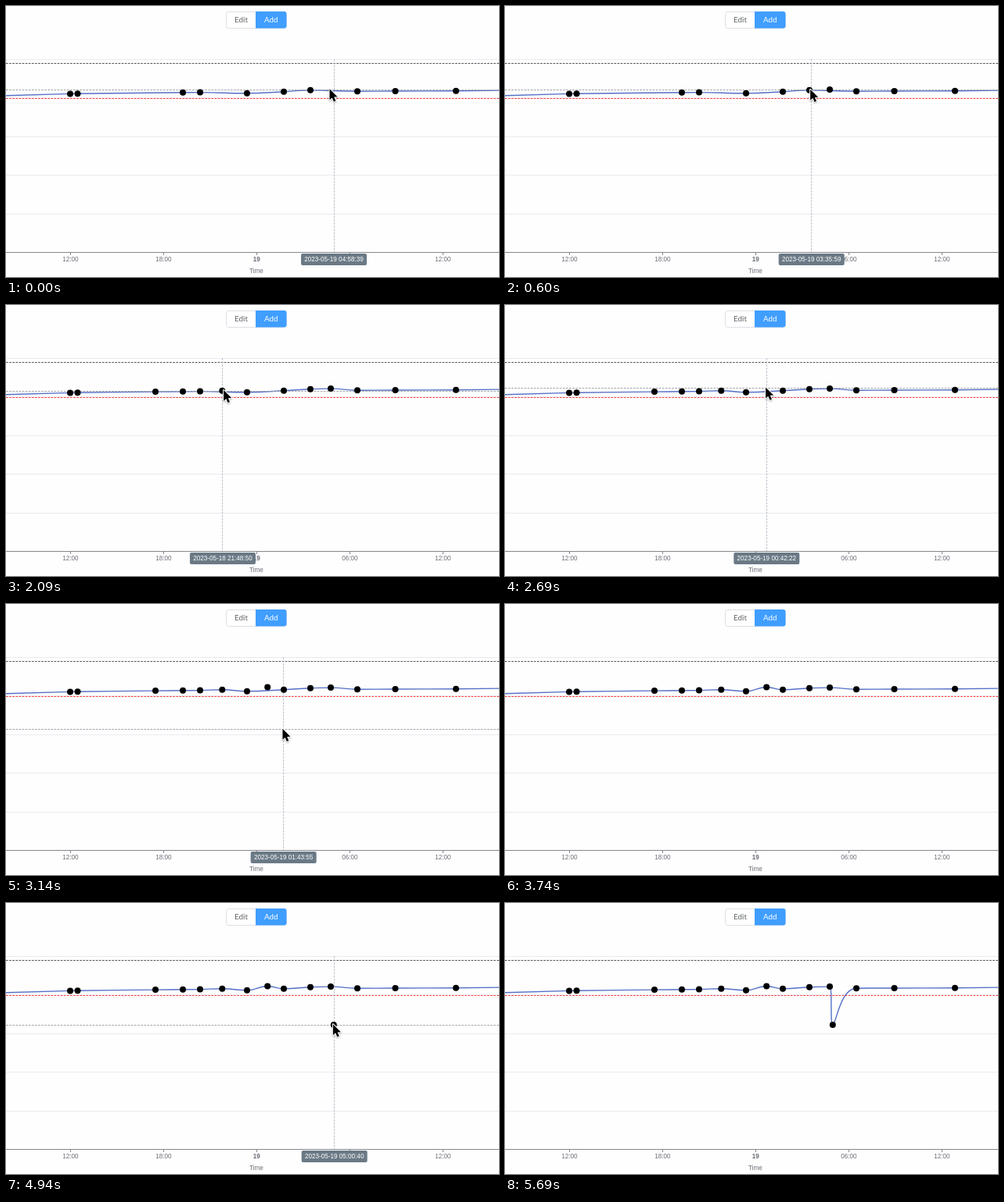
Recreate the animation shown at these times as an HTML page with a canvas. Size 630 by 347 pixels, loop 6.3 s.

```html
<!DOCTYPE html>
<html lang="en">
<head>
<meta charset="utf-8">
<title>Time chart</title>
<style>
  html, body { margin: 0; width: 100%; height: 100%; overflow: hidden; background: #fefefe; }
  canvas { display: block; width: 630px; height: 347px; }
</style>
</head>
<body>
<canvas id="stage"></canvas>
<script>
const W = 630, H = 347, LOOP = 6300;
const TOP = 68.4, ROW = 49.4, AXIS = 315.5;
const HOUR = 119 / 6, MIDNIGHT_X = 320.3;
const LINE_DELAY = 600;
const SANS = '"Liberation Sans", Arial, sans-serif';

const canvas = document.getElementById('stage');
const ctx = canvas.getContext('2d');
const dpr = window.devicePixelRatio || 1;
canvas.width = W * dpr;
canvas.height = H * dpr;
ctx.scale(dpr, dpr);

const basePoints = [
  [-60, 116.5], [82, 112.4], [91.5, 112.2], [226, 110.8], [248, 110.6], [308, 111.8],
  [355, 109.7], [389, 107.7], [449, 109.2], [497.5, 109], [575, 108.7], [690, 107.6]
];
// click time, x, y
const clicks = [
  [300, 415, 107.1], [1350, 191, 111.1], [2090, 276.3, 109.8],
  [2840, 334.2, 106.5], [4940, 418.8, 155.9]
];

// Seconds relative to midnight of the 19th
const clock = (h, m, s) => h * 3600 + m * 60 + s;
const xToSec = x => (x - MIDNIGHT_X) / HOUR * 3600;
const secToX = s => MIDNIGHT_X + s / 3600 * HOUR;

// time, seconds, y, arrow lag
const visits = [
  [
    [0, clock(4, 58, 39), 107.3, -5.5],
    [150, xToSec(415), 107.3, -1.5],
    [450, xToSec(415), 107.3, -1.5],
    [1200, clock(-6, -31, -29), 111.2, -2],
    [1500, clock(-6, -31, -29), 111.2, -1.5],
    [2090, clock(-2, -11, -10), 110, 1.2],
    [2240, clock(-2, -11, -10), 110, -1],
    [2690, clock(0, 42, 22), 106.6, -1.2],
    [2990, clock(0, 42, 22), 106.6, -1.2],
    [3290, xToSec(375), 215, -1.2],
    [3440, xToSec(410), 322, -1.2],
    [3740, xToSec(430), 352, -1.2]
  ],
  [
    [4490, xToSec(470), 322, -1.5],
    [4940, clock(5, 0, 40), 156.2, -1.8],
    [5090, clock(5, 0, 40), 156.2, -1.5],
    [5390, xToSec(556), 321, -1.5],
    [5690, xToSec(570), 352, -1.5]
  ]
];

const clamp = (v, a, b) => Math.max(Math.min(a, b), Math.min(Math.max(a, b), v));
const smoothstep = p => p * p * (3 - 2 * p);

// The picture advances in steps of 150 ms
function stepTime(t) {
  const start = t < 2090 ? 0 : 2090;
  return start + Math.floor((t - start) / 150 + 1e-6) * 150;
}

function pointerAt(t) {
  const keys = visits.find(k => t >= k[0][0] && t < k[k.length - 1][0]);
  if (!keys) return null;
  const i = keys.findIndex(k => k[0] > t);
  const a = keys[i - 1], b = keys[i];
  const p = smoothstep((t - a[0]) / (b[0] - a[0]));
  const [sec, y, lag] = [1, 2, 3].map(n => a[n] + (b[n] - a[n]) * p);
  return { sec, x: secToX(sec), y, lag };
}

function pointsAt(t, delay) {
  const added = clicks.filter(c => t >= c[0] + delay).map(c => [c[1], c[2]]);
  return basePoints.concat(added).sort((a, b) => a[0] - b[0]);
}

function line(x1, y1, x2, y2, color, width = 1, dash = []) {
  ctx.beginPath();
  ctx.setLineDash(dash);
  ctx.moveTo(x1, y1);
  ctx.lineTo(x2, y2);
  ctx.strokeStyle = color;
  ctx.lineWidth = width;
  ctx.stroke();
  ctx.setLineDash([]);
}

function text(s, x, y, color, font) {
  ctx.font = font;
  ctx.fillStyle = color;
  ctx.textAlign = 'center';
  ctx.textBaseline = 'alphabetic';
  ctx.fillText(s, x, y);
}

// Handles follow the neighbours' direction, clamped to each segment's box
function handles(prev, p, next) {
  const before = Math.hypot(p[0] - prev[0], p[1] - prev[1]);
  const after = Math.hypot(next[0] - p[0], next[1] - p[1]);
  const share = after / (before + after);
  const into = [], out = [];
  for (const k of [0, 1]) {
    const o = clamp(p[k] + (next[k] - prev[k]) * 0.5 * share, p[k], next[k]);
    into[k] = clamp(p[k] - (o - p[k]) * before / after, prev[k], p[k]);
    out[k] = p[k] + (p[k] - into[k]) * after / before;
  }
  return { into, out };
}

function drawCurve(pts) {
  ctx.beginPath();
  ctx.moveTo(...pts[0]);
  let out = pts[0];
  for (let i = 1; i < pts.length; i++) {
    const h = i < pts.length - 1
      ? handles(pts[i - 1], pts[i], pts[i + 1])
      : { into: pts[i], out: pts[i] };
    ctx.bezierCurveTo(...out, ...h.into, ...pts[i]);
    out = h.out;
  }
  ctx.strokeStyle = '#5470c6';
  ctx.lineWidth = 1.4;
  ctx.lineJoin = 'round';
  ctx.stroke();
}

function drawButtons() {
  ctx.lineWidth = 1;
  ctx.beginPath();
  ctx.roundRect(281.5, 7.5, 77, 21, 3);
  ctx.fillStyle = '#fff';
  ctx.fill();
  ctx.strokeStyle = '#dcdfe6';
  ctx.stroke();
  ctx.beginPath();
  ctx.roundRect(319, 7, 39.5, 21.5, [0, 3, 3, 0]);
  ctx.fillStyle = '#409eff';
  ctx.fill();
  const font = '9.8px Lato, sans-serif';
  text('Edit', 300.5, 21, '#606266', font);
  text('Add', 338.8, 21, '#fff', font);
}

function drawAxes() {
  for (let i = 0; i < 5; i++) {
    const y = Math.floor(TOP + i * ROW) + 0.5;
    line(0, y, W, y, '#e8ebf1');
  }
  line(0, AXIS, W, AXIS, '#85878e');
  ['12:00', '18:00', '19', '06:00', '12:00'].forEach((label, i) => {
    const x = MIDNIGHT_X + (i - 2) * 119;
    const tick = Math.floor(x) + 0.5;
    line(tick, 316, tick, 319, '#85878e');
    text(label, x, 327.3, '#6e7079', (label === '19' ? 'bold ' : '') + '8.15px ' + SANS);
  });
  text('Time', 320, 341.7, '#6e7079', '8.15px ' + SANS);
}

function stamp(sec) {
  return new Date(Date.UTC(2023, 4, 19) + Math.round(sec) * 1000)
    .toISOString().slice(0, 19).replace('T', ' ');
}

function drawCrosshair({ sec, x, y }) {
  const px = Math.floor(x) + 0.5, py = Math.floor(y) + 0.5;
  line(0, py, W, py, '#a3a5aa', 1, [2.7, 1.4]);
  line(px, 68, px, 315, '#bcbfca', 1, [2.7, 1.4]);
  ctx.beginPath();
  ctx.roundRect(x - 42, 317, 84, 15, 2);
  ctx.fillStyle = '#6a7985';
  ctx.fill();
  text(stamp(sec), x, 327.3, '#fff', '8.15px ' + SANS);
}

function drawArrow(x, y) {
  const shape = [[0, 0], [0, 14], [3.2, 11.1], [5.4, 16.2], [7.9, 15.1], [5.7, 10.2], [10, 10]];
  ctx.save();
  ctx.translate(x, y);
  ctx.beginPath();
  shape.forEach(p => ctx.lineTo(...p));
  ctx.closePath();
  ctx.lineJoin = 'round';
  ctx.shadowColor = 'rgba(0,0,0,0.3)';
  ctx.shadowBlur = 2 * dpr;
  ctx.shadowOffsetY = dpr;
  ctx.strokeStyle = '#fff';
  ctx.lineWidth = 2;
  ctx.stroke();
  ctx.shadowColor = 'transparent';
  ctx.fillStyle = '#000';
  ctx.fill();
  ctx.restore();
}

function draw(t) {
  ctx.fillStyle = '#fefefe';
  ctx.fillRect(0, 0, W, H);
  drawButtons();
  drawAxes();
  drawCurve(pointsAt(t, LINE_DELAY));
  line(0, 73.5, W, 73.5, '#55565a', 1, [2.7, 1.4]);
  line(0, 118.5, W, 118.5, '#ff4040', 1, [2.7, 1.4]);

  const pointer = pointerAt(t);
  const inside = pointer && pointer.y < AXIS;
  if (inside) drawCrosshair(pointer);
  ctx.fillStyle = '#000';
  for (const [x, y] of pointsAt(t, 0)) {
    ctx.beginPath();
    ctx.arc(x, y, 4, 0, Math.PI * 2);
    ctx.fill();
  }
  if (pointer) drawArrow(pointer.x + pointer.lag, pointer.y - 1);
}

const began = performance.now();
function tick() {
  draw(stepTime((performance.now() - began) % LOOP));
  requestAnimationFrame(tick);
}
tick();
</script>
</body>
</html>
```
